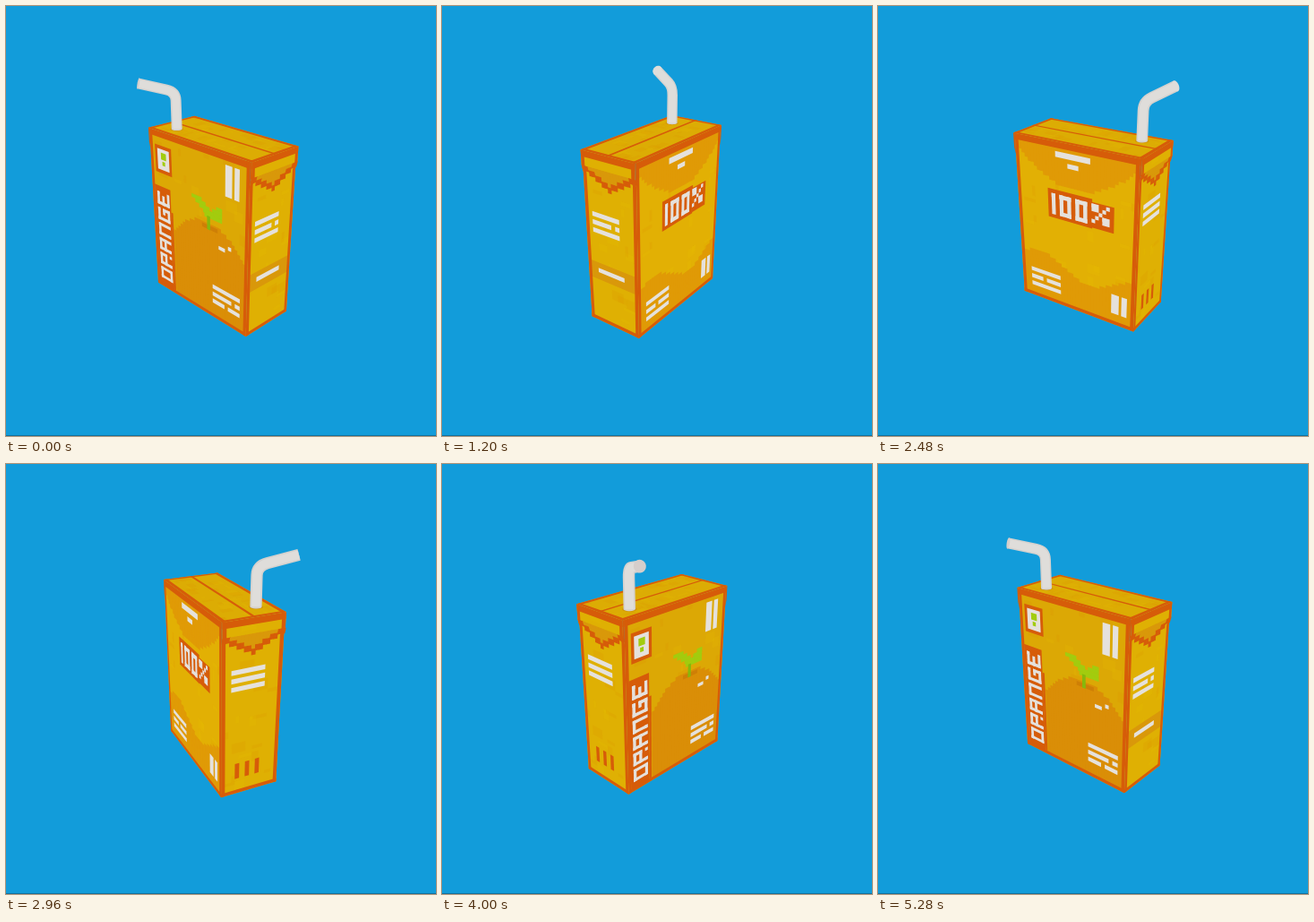
Animation, 480 px wide and 480 px high, one loop 5360 ms. Source, as an HTML page with a canvas:

```html
<!DOCTYPE html>
<html lang="en">
<head>
<meta charset="utf-8">
<title>Juice box</title>
<style>
html, body { margin: 0; width: 100%; height: 100%; overflow: hidden; background: #129cda; }
canvas { display: block; }
</style>
</head>
<body>
<canvas id="stage" width="480" height="480"></canvas>
<script>
const ctx = document.getElementById('stage').getContext('2d');
const LOOP = 5360, STEP = 80, START = 46;
const COLS = 38, DEEP = 17, ROWS = 50, CELL = 3.95;   // the box, measured in art pixels
const A = COLS * CELL / 2, C = DEEP * CELL / 2, H = ROWS * CELL / 2;
const FOCAL = 620, SIN = 0.44, COS = 0.898, CX = 238.5, CY = 241;
const DARK = '#d65c09', WHITE = '#e5e1dc', LEAF = '#a2cc0e', STEM = '#86b80c';

// Letters as strokes between "xy" points; each stroke fills the cells it spans.
const GLYPHS = {
  O: '00 30 34 04 00',
  R: '04 00 30 32 02|34',
  A: '04 00 30 34|02 32',
  N: '04 00 30 34',
  G: '30 00 04 34 32 22',
  E: '30 00 04 34|02 22',
  1: '00 04',
  0: '00 20 24 04 00',
  '%': '00 11|40|31|22|13|04|33 44'
};
let yawSin = 0, yawCos = 1;

function project([x, y, z]) {
  const px = x * yawCos - z * yawSin, pz = x * yawSin + z * yawCos;
  const depth = 1 - (y * SIN + pz * COS) / FOCAL;
  return [CX + px / depth, CY - (y * COS - pz * SIN) / depth, depth];
}

function fill(points, color) {
  ctx.fillStyle = color;
  ctx.beginPath();
  points.forEach(p => ctx.lineTo(...project(p).slice(0, 2)));
  ctx.fill();
}

// The folded ends stick out a little at the top of the narrow sides.
const bulge = r => 2 * Math.max(0, Math.min(1, (6 - r) / 2));

const maps = {
  front: (u, r) => [CELL * u - A, H - CELL * r, C],
  back: (u, r) => [A - CELL * u, H - CELL * r, -C],
  left: (u, r) => [-A - bulge(r), H - CELL * r, CELL * u - C],
  right: (u, r) => [A + bulge(r), H - CELL * r, C - CELL * u],
  top: (u, r) => [(CELL * u - A) * (1 + bulge(0) / A), H, CELL * r - C]
};

function mottle(seed, cols, rows) {
  const random = () => (seed = seed * 16807 % 2147483647) / 2147483647;
  const pick = n => 1 + Math.floor(random() * n);
  return Array.from({ length: cols }, () => {
    const w = pick(4), h = pick(3);
    return [pick(cols - w - 1), pick(rows - h - 1), w, h,
      random() < 0.5 ? 'rgba(235,195,0,.14)' : 'rgba(225,130,0,.12)'];
  });
}

function makeFace(name, cols, rows, base, seed, decorate) {
  const map = maps[name], spots = mottle(seed, cols, rows);
  const rect = (u, r, w, h, color = WHITE) => {
    const cuts = [r, ...[4, 6].filter(c => c > r && c < r + h), r + h];
    fill([...cuts.map(c => map(u, c)), ...cuts.reverse().map(c => map(u + w, c))], color);
  };
  const draw = () => {
    rect(0, 0, cols, rows, base);
    spots.forEach(s => rect(...s));
    decorate(rect);
    rect(0, 0, cols, name === 'top' ? 1.1 : 1.7, DARK);
    rect(0, rows - 1.1, cols, 1.1, DARK);
    rect(0, 0, 1.1, rows, DARK);
    rect(cols - 1.1, 0, 1.1, rows, DARK);
    if (name === 'front' || name === 'back')
      for (const [edge, out] of [[0, -0.5], [cols, cols + 0.5]])
        fill([map(edge, 0), map(out, 0), map(out, 4), map(edge, 6)], DARK);
  };
  const visible = () => {
    const [a, b, c] = [map(0, rows), map(cols, rows), map(0, 6)].map(project);
    return (b[0] - a[0]) * (c[1] - a[1]) - (b[1] - a[1]) * (c[0] - a[0]) < 0;
  };
  return { draw, visible };
}

// Calls cell(x, y, w, h) for each stroke of a letter.
function glyph(char, cell) {
  for (const line of GLYPHS[char].split('|')) {
    const points = line.split(' ').map(p => [...p].map(Number));
    points.forEach(([x, y], i) => {
      const [px, py] = points[Math.max(0, i - 1)];
      cell(Math.min(x, px), Math.min(y, py), Math.abs(x - px) + 1, Math.abs(y - py) + 1);
    });
  }
}

// Small print: each line may have a gap at a fraction of its width.
function smallPrint(rect, u, r, w, pitch, gaps) {
  gaps.forEach((gap, i) => {
    rect(u, r + i * pitch, w * gap, 1.35);
    if (gap < 1) rect(u + w * gap + 1.3, r + i * pitch, w * (1 - gap) - 1.3, 1.35);
  });
}

function twinBars(rect, u, r, h) {
  rect(u, r, 2.4, h);
  rect(u + 3.2, r, 1.7, h);
}

function frontArt(rect) {
  for (let u = 9; u < 37; u++) {
    const top = Math.round(37 - Math.sqrt(263 - (u - 22.5) ** 2));
    rect(u, top, 1.3, 49 - top, '#da8e07');
  }
  rect(21, 21.5, 6, 1.2, '#ce7f06');

  rect(1, 16.2, 7, 33, DARK);
  rect(8, 23, 0.8, 26, DARK);
  [...'ORANGE'].forEach((char, i) => glyph(char, (x, y, w, h) =>
    rect(2 + y * 1.08, 47 - i * 5 - x - w, h * 1.08, w)));

  rect(2, 4, 7, 8, DARK);
  rect(3, 5, 5, 6);
  rect(4.5, 6, 2.2, 2, LEAF);
  rect(5, 8.5, 1.2, 1.2, LEAF);

  for (let i = 0; i < 4; i++) {
    const u = 26.5 - i * 1.5;
    rect(17 + i * 1.5, 14.2 + i, 4, 1.1, LEAF);
    rect(u, 15.2 + i, 28.7 - u, 1.1, LEAF);
  }
  rect(23, 18.8, 1.2, 4, STEM);

  rect(27.4, 26.2, 2.4, 1.1);
  rect(30.9, 25.1, 1.2, 1.1);
  twinBars(rect, 29.8, 2.8, 8.4);
  smallPrint(rect, 25, 39.2, 10.5, 2.35, [1, 0.7, 0.45]);
}

function backArt(rect) {
  for (let u = 1; u < 37; u++) {
    const low = Math.round(12.5 - ((u - 18.5) / 6) ** 2);
    const high = Math.round(37 - 3.2 * Math.cos((u - 6) * Math.PI / 17));
    rect(u, 1.5, 1.3, low - 1.5, '#e09a06');
    rect(u, high, 1.3, 49 - high, '#e09a06');
  }
  rect(10.4, 13.5, 14.2, 8.5, DARK);
  rect(24.5, 14.3, 6.7, 7.4, DARK);
  let left = 11.6;
  for (const char of '100%') {
    const size = char === '%' ? 1.1 : 1.25;
    glyph(char, (x, y, w, h) => rect(left + x * size, 14.7 + y * size, w * size, h * size));
    left += char === '1' ? 2.6 : 5.1;
  }
  rect(13.2, 2.6, 10.8, 1.6);
  rect(17, 5.4, 3.4, 1.3);
  smallPrint(rect, 3.3, 40.2, 10.5, 2.45, [1, 0.4, 1]);
  twinBars(rect, 30.8, 40.2, 6.2);
}

function foldedFlap(rect) {
  for (let u = 0; u < DEEP; u++) {
    const edge = 4 + Math.floor((8 - Math.abs(u - 8)) / 2) * 1.05;
    rect(u, 4, 1.2, edge - 4, '#d9980a');
    rect(u, edge, 1.2, 1.6, DARK);
  }
}

function leftArt(rect) {
  foldedFlap(rect);
  smallPrint(rect, 2.7, 13, 9.4, 2.3, [1, 1, 1]);
  for (let u = 4; u <= 10; u += 3) rect(u, 40.4, 1.3, 4.8, DARK);
}

function rightArt(rect) {
  foldedFlap(rect);
  rect(1, 31, 15, 5.3, '#d9980a');
  smallPrint(rect, 2.3, 16.2, 9, 2.3, [1, 0.7, 1]);
  rect(3.5, 32.7, 9, 1.4);
}

const walls = [
  makeFace('front', COLS, ROWS, '#dca805', 11, frontArt),
  makeFace('back', COLS, ROWS, '#e2b004', 29, backArt),
  makeFace('left', DEEP, ROWS, '#dfb003', 47, leftArt),
  makeFace('right', DEEP, ROWS, '#dfb003', 83, rightArt)
];
const lid = makeFace('top', COLS, DEEP, '#dcac04', 101, rect => rect(0, 8.1, COLS, 0.8, DARK));

// Disc around a point, spanned by two unit vectors.
function disc(center, a, b, radius, color) {
  fill(Array.from({ length: 20 }, (_, i) => {
    const t = i * Math.PI / 10, c = radius * Math.cos(t), s = radius * Math.sin(t);
    return center.map((v, k) => v + a[k] * c + b[k] * s);
  }), color);
}

function drawStraw() {
  const base = [-51, H, 15], elbow = [-51, 139, 15], tip = [-69, 150, 49];
  const low = [-51, 130, 15], high = elbow.map((v, k) => v + (tip[k] - v) * 0.25);
  const X = [1, 0, 0], Z = [0, 0, 1], R = 5.6;
  disc(base, X, Z, R + 1.5, '#d1930a');
  disc(base, X, Z, R, '#d4d1ce');

  const [p0, p1, p2, p3, p4] = [base, low, elbow, high, tip].map(project);
  const tube = (color, width) => {
    ctx.strokeStyle = color;
    ctx.lineWidth = width / p2[2];
    ctx.lineJoin = 'round';
    ctx.beginPath();
    ctx.moveTo(p0[0], p0[1]);
    ctx.lineTo(p1[0], p1[1]);
    ctx.quadraticCurveTo(p2[0], p2[1], p3[0], p3[1]);
    ctx.lineTo(p4[0], p4[1]);
    ctx.stroke();
  };
  tube('#d4d1ce', 2 * R);
  tube('#dfddda', 1.5 * R);

  const d = tip.map((v, k) => v - elbow[k]), n = Math.hypot(...d), flat = Math.hypot(d[0], d[2]);
  const side = [d[2] / flat, 0, -d[0] / flat];
  const up = [-d[0] * d[1] / (flat * n), flat / n, -d[2] * d[1] / (flat * n)];
  const facing = d[1] * SIN + (d[0] * yawSin + d[2] * yawCos) * COS > 0;
  disc(tip, side, up, R, facing ? '#d6cecb' : '#dfddda');
}

function frame() {
  const time = Math.floor(performance.now() % LOOP / STEP) * STEP;
  const yaw = (START + 360 * time / LOOP) * Math.PI / 180;
  yawSin = Math.sin(yaw);
  yawCos = Math.cos(yaw);
  ctx.fillStyle = '#129cda';
  ctx.fillRect(0, 0, 480, 480);
  ctx.fillStyle = '#10719f';
  ctx.fillRect(0, 479, 480, 1);
  walls.filter(w => w.visible()).forEach(w => w.draw());
  lid.draw();
  drawStraw();
  requestAnimationFrame(frame);
}
frame();
</script>
</body>
</html>
```
